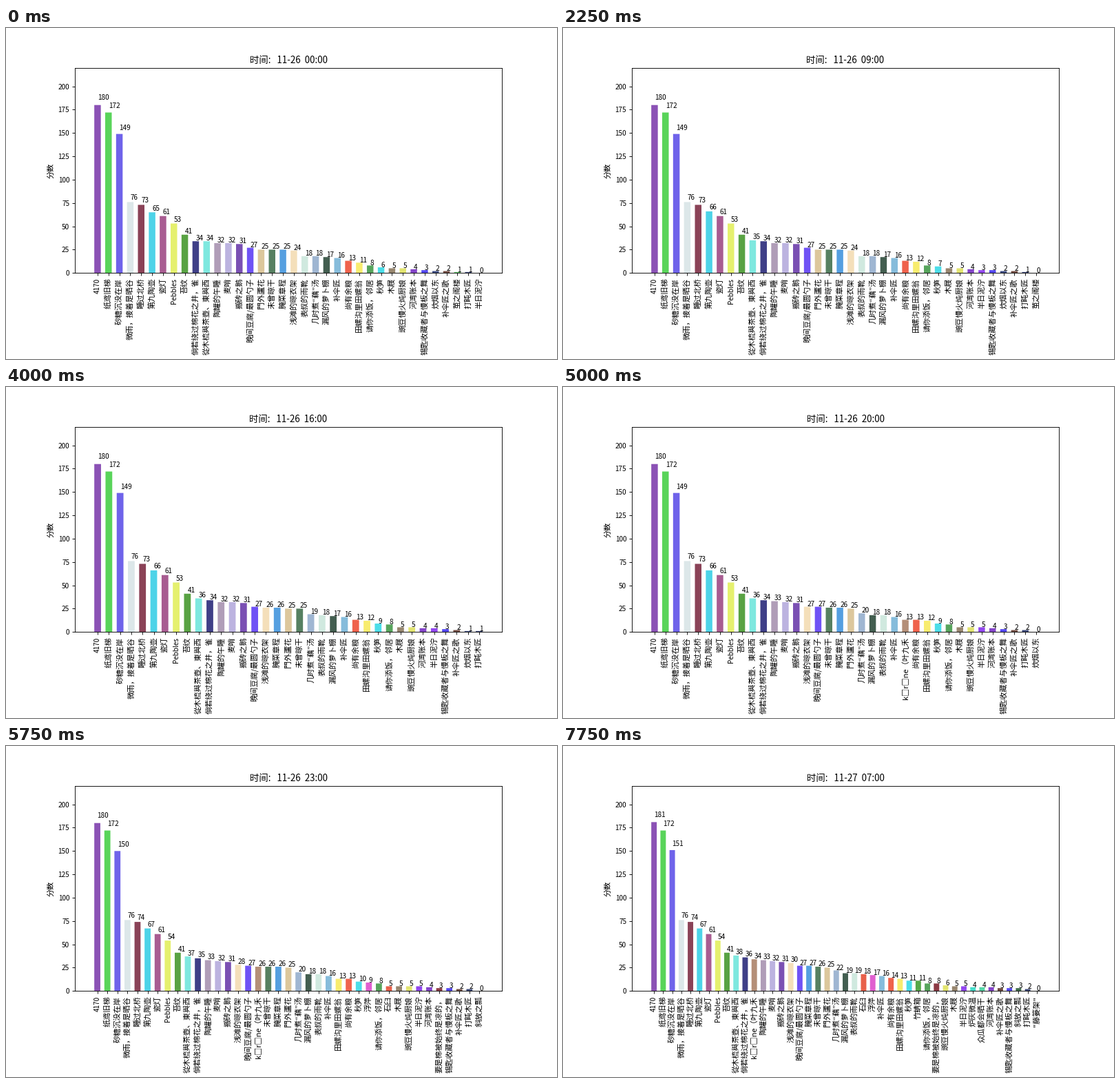
Write a matplotlib script that moves like this. It is 800 by 480 pixels and loops after 8000 ms.

```python
import math

import matplotlib.pyplot as plt
from matplotlib.animation import FuncAnimation

plt.rcParams["font.family"] = "Noto Sans CJK JP"

HOURS = 32
LAST = HOURS - 1
DIGIT_SIZE = 9

# name, colour, score[, final score, hour the change begins];
# rows are in tie-breaking order
ENTRIES = [
    ("4170", "#8b52b5", 180, 181, 18),
    ("纸鸢旧梯", "#59d45a", 172),
    ("砂糖沉没在岸", "#6f63ea", 149, 151, 17),
    ("微雨，接着是晒谷", "#dce7e9", 76),
    ("睡过北桥", "#8a4257", 73, 74, 13),
    ("第九陶壶", "#4dd3e8", 65, 67, -5),
    ("瓷灯", "#a85c91", 61),
    ("Pebbles", "#e5f06e", 53, 54, 13),
    ("苔纹", "#58a243", 41),
    ("倘若绕过棉花之井，雀", "#3f3f87", 34, 36, 17),
    ("從木梳與茶壺、東與西", "#7ee8df", 34, 38, 5),
    ("陶罐的午睡", "#b09db8", 32, 33, 5),
    ("麦哨", "#bcb3e0", 32),
    ("搬砖之鹅", "#7a50b3", 31),
    ("浅滩的晾衣架", "#f4dfba", 24, 30, 11),
    ("晚间豆腐/最圆勺子", "#6f52f5", 27),
    ("k□r□ne（叶九禾", "#b48f78", 0, 34, 18),
    ("門外蘆花", "#dcc79c", 25),
    ("未曾晾干", "#568061", 25, 26, 5),
    ("腌菜章程", "#559fe0", 25, 27, 9),
    ("漏风的萝卜棚", "#435e50", 17, 19, 12),
    ("表叔的雨靴", "#d0e9df", 18, 19, 25),
    ("几时煮“藕”汤", "#9fb6d2", 18, 22, 10),
    ("补伞匠", "#86bcdb", 16),
    ("浮萍", "#e05fd0", 0, 17, 20.5),
    ("石臼", "#e8604a", 0, 18, 22),
    ("田螺沟里田螺翁", "#f8ec6e", 11, 13, -5),
    ("尚有余粮", "#ef624c", 13, 14, 25),
    ("秋笋", "#4cdde8", 6, 11, 0),
    ("竹蜻箱", "#55a848", 0, 11, 23.5),
    ("请你添饭，邻居", "#57a45c", 8),
    ("要是棉被始终是凉的，", "#8c3a44", 0, 8, 21.5),
    ("炉灰微温", "#45dcc9", 0, 4, 24),
    ("众瓜都会晒干", "#55d6a6", 0, 4, 25),
    ("河湾账本", "#8444c8", 4),
    ("木屐", "#97866f", 5),
    ("豌豆慢火炖厨娘", "#e2e470", 5, 6, 18),
    ("炊烟以东", "#3b4a80", 2, -3, 12),
    ("补伞匠之歌", "#6f4a40", 2, 3, 25),
    ("茧之阁楼", "#59c463", 1, -5, 5),
    ("半日泥泞", "#9247ee", 0, 5, 0),
    ("锡匙收藏者与慢板之舞", "#5347f0", 3),
    ("打盹木匠", "#3a4677", 1, 2, 5),
    ("斜放之瓢", "#3f6b4b", 0, 3, 23),
    ('"藤篓架"', "#808080", 0, 0, 26),
]


def score(hour, first, final=None, since=0):
    """Steady drift for old bars, a fast early climb for newcomers."""
    if final is None:
        return first
    newcomer = first == 0
    if newcomer and hour < since:
        return -1
    t = max(0, (hour - since) / (LAST - since))
    if newcomer:
        t = 1 - (1 - t) ** 3
    return math.floor(first + (final - first) * t + 0.5)


def ranking(hour):
    """Bars from high to low; those below zero drop out."""
    rows = [(name, color, score(hour, *course))
            for name, color, *course in ENTRIES]
    return sorted((r for r in rows if r[2] >= 0), key=lambda r: -r[2])


fig, ax = plt.subplots(figsize=(10, 6), dpi=80)
fig.subplots_adjust(left=0.125, right=0.9, top=0.88, bottom=0.26)


def draw(hour):
    ax.clear()
    names, colors, scores = zip(*ranking(hour))
    places = range(len(names))
    ax.bar(places, scores, width=0.6, color=colors, snap=False)
    for x, value in zip(places, scores):
        ax.text(x, value * 1.03, str(value), size=DIGIT_SIZE)

    ax.set_ylim(0, 220)
    ax.set_yticks(range(0, 201, 25))
    ax.tick_params(axis="y", labelsize=DIGIT_SIZE)
    ax.set_xticks(places, names, rotation=90, size=10)
    for label in ax.get_xticklabels():
        if label.get_text().isascii():
            label.set_size(DIGIT_SIZE)
    ax.set_ylabel("分数", size=10)
    day, clock = divmod(hour, 24)
    ax.set_title(f"时间:   11-{26 + day}  {clock:02d}:00", size=12)
    return []


anim = FuncAnimation(fig, draw, frames=HOURS, init_func=lambda: [],
                     interval=250, repeat=True, repeat_delay=0)
plt.show()
```
